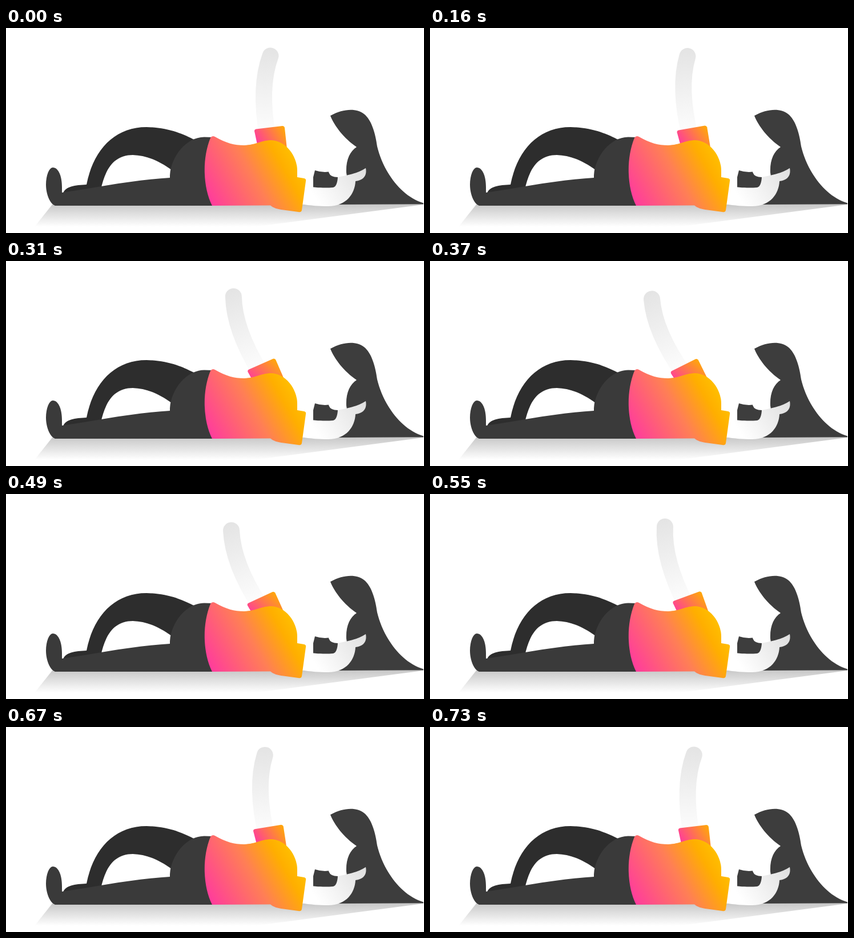
Recreate the animation shown at these times as an HTML page. Size 732 by 360 pixels, loop 0.8 s.

```html
<!DOCTYPE html>
<html lang="en">
<head>
<meta charset="utf-8">
<title>Waving arm</title>
<style>
  html, body { margin: 0; width: 100%; height: 100%; overflow: hidden; background: #fff; }
  svg { display: block; width: 732px; height: 360px; }
</style>
</head>
<body>
<svg viewBox="0 0 732 360">
  <defs>
    <linearGradient id="shade" gradientUnits="userSpaceOnUse" x1="0" y1="310" x2="0" y2="349">
      <stop offset="0" stop-color="#c8c8c8"/>
      <stop offset="1" stop-color="#fff"/>
    </linearGradient>
    <linearGradient id="shirt" gradientUnits="userSpaceOnUse" x1="352" y1="298" x2="506" y2="210">
      <stop offset="0" stop-color="#ff3b9d"/>
      <stop offset=".5" stop-color="#ff7f55"/>
      <stop offset=".8" stop-color="#ffae00"/>
      <stop offset="1" stop-color="#ffc400"/>
    </linearGradient>
    <linearGradient id="band" gradientUnits="userSpaceOnUse" x1="438" y1="200" x2="486" y2="172">
      <stop offset="0" stop-color="#ff3b9d"/>
      <stop offset="1" stop-color="#ffa808"/>
    </linearGradient>
    <linearGradient id="skin" gradientUnits="userSpaceOnUse" x1="460" y1="36" x2="460" y2="184">
      <stop offset="0" stop-color="#e4e4e4"/>
      <stop offset="1" stop-color="#fdfdfd"/>
    </linearGradient>
    <linearGradient id="skin2" gradientUnits="userSpaceOnUse" x1="628" y1="250" x2="545" y2="304">
      <stop offset="0" stop-color="#e0e0e0"/>
      <stop offset="1" stop-color="#fff"/>
    </linearGradient>
  </defs>

  <path fill="url(#shade)" d="M81 310H731L436 349H50Z"/>

  <!-- legs -->
  <path fill="#2d2d2d" d="M100 291C103 278 121 276 141 275C153 214 190 174 246 174C285 175 310 186 331 197L291 250C266 232 246 224 222 223C190 223 174 246 166 284Z"/>
  <path fill="#3a3a3a" d="M98 289C160 280 220 267 287 263C286 232 312 192 347 191.5L365 192V312H86C76 308 70 290 70 275C70 258 76 245 82 245C91 245 98 258 98 280Z"/>

  <!-- head -->
  <path fill="#3d3d3d" d="M568 154C590 142 613 140 627 151C640 161 647 185 650 208C660 250 690 295 731 307.5V309.5L580 310L600 280L596 254C595 232 602 217 614 209C592 194 575 172 568 154Z"/>
  <path fill="#3d3d3d" d="M541 250Q553 254 565 252.5Q567 262 581 262V283H538V262Z"/>
  <path fill="url(#skin2)" d="M518 277C545 281 560 281 573 280Q580 278 581 262C598 258 615 256 630 246C632 256 629 267 612 269C611 290 597 313 564 313C548 313 535 312 515 309Z"/>

  <!-- raised arm -->
  <path id="arm" fill="none" stroke="url(#skin)" stroke-width="29" d="M458 190C451 150 446 95 463 49" stroke-linecap="round"/>
  <path id="cuff" fill="url(#band)" d="M438 177.5L484 172Q487 172 488 175L492 212L442 214L435 181Q435 178 438 177.5Z"/>

  <path fill="url(#shirt)" d="M358 193Q361 188 366 191C385 202 400 206 417 206C438 205 445 198 463 197C490 197 510 225 510 250V262L522 264Q526 265 525 269L518 320Q517 324 512 323L486 319.5C475 318 468 316 463 311.5L361 312C345 280 343 230 358 193Z"/>
</svg>
<script>
const LOOP = 800, HOLD = 100, STEP = 30, SWING = 25.4;
const arm = document.getElementById('arm');
const cuff = document.getElementById('cuff');

// cubic-bezier(.42, 0, .58, 1)
function ease(x) {
  if (x <= 0) return 0;
  if (x >= 1) return 1;
  let lo = 0, hi = 1;
  for (let i = 0; i < 24; i++) {
    const s = (lo + hi) / 2, r = 1 - s;
    if (1.26 * r * r * s + 1.74 * r * s * s + s * s * s < x) lo = s;
    else hi = s;
  }
  return lo * lo * (3 - 2 * lo);
}

function draw(t) {
  const k = t < HOLD ? 0 : Math.min(22, 1 + Math.floor((t - HOLD) / STEP));
  const angle = -SWING * (ease(k / 11) - ease((k - 11.5) / 11.25));
  arm.setAttribute('transform', `rotate(${angle} 466 226)`);
  cuff.setAttribute('transform', `rotate(${angle * 0.8} 475 226)`);
}

function tick() {
  draw(performance.now() % LOOP);
  requestAnimationFrame(tick);
}
tick();
</script>
</body>
</html>
```
